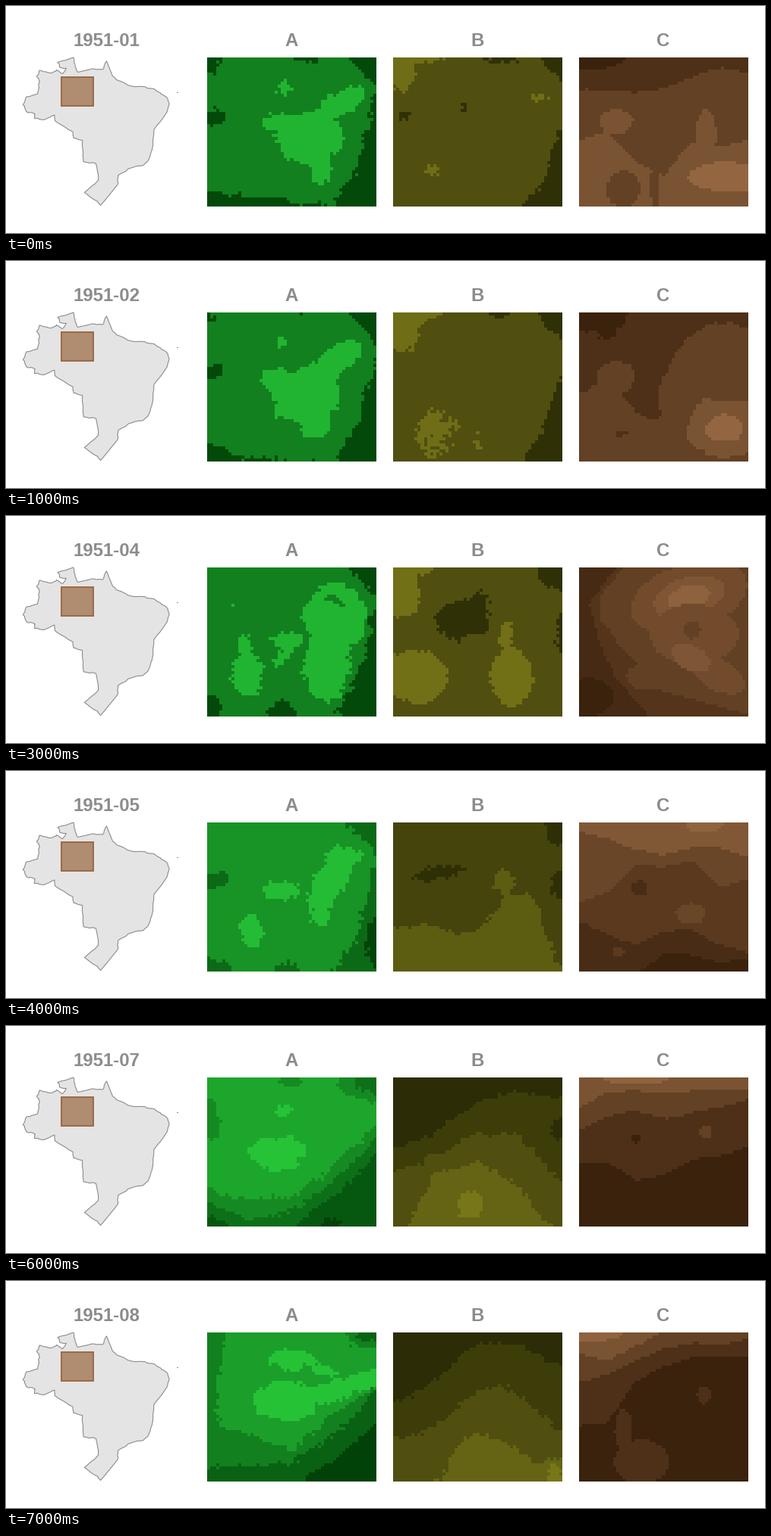
A matplotlib script for the animation above (8000 ms loop, 1000 by 300 pixels).

```python
import numpy as np
import matplotlib.pyplot as plt
from matplotlib.animation import FuncAnimation

COLS, ROWS = 55, 49
LEFT = {"A": 265, "B": 510, "C": 755}
JAG = {"A": 0.9, "B": 0.8, "C": 0.15}
RAMP = {
    "A": ((0, 66, 8), (39, 198, 56)),
    "B": ((44, 44, 6), (123, 122, 26)),
    "C": ((58, 33, 12), (147, 102, 65)),
}
GREY = "#8c8c8c"

rng = np.random.default_rng(7)
fields = {}


def blur(field):
    padded = np.pad(field, 2, mode="edge")
    return sum(padded[r:r + ROWS, c:c + COLS] for r in range(5) for c in range(5)) / 25


def ragged(name):
    """Cell noise plus a smooth drift, which frays the edges of shapes."""
    noise = rng.normal(0, JAG[name], (2, ROWS, COLS))
    return noise[0] + 4 * blur(noise[1])


def panel(name, month, base):
    """Start a field; coordinates run from 0 to 100 both ways."""
    global grid, gx, gy
    grid = fields[name, month] = np.full((ROWS, COLS), float(base))
    gx, gy = np.meshgrid((np.arange(COLS) + 0.5) * 100 / COLS,
                         (np.arange(ROWS) + 0.5) * 100 / ROWS)
    gx, gy = gx + ragged(name), gy + ragged(name)


def blob(levels, x, y, rx, ry, tilt=0):
    """Tilted ellipse; several levels nest inside each other."""
    c, s = np.cos(np.radians(tilt)), np.sin(np.radians(tilt))
    u, v = (gx - x) * c + (gy - y) * s, (gy - y) * c - (gx - x) * s
    radius = np.hypot(u / rx, v / ry)
    for i, level in enumerate(np.atleast_1d(levels)):
        grid[radius < 0.6 ** i] = level


def edge(side, level, *curve):
    """Fill from one side up to a line through evenly spaced key points."""
    along, across = (gx, gy) if side in ("top", "bottom") else (gy, gx)
    line = np.interp(along, np.linspace(0, 100, len(curve)), curve)
    grid[across < line if side in ("top", "left") else across > line] = level


def terraces(side, levels, step, *curve):
    for i, level in enumerate(levels):
        edge(side, level, *(value + i * step for value in curve))


def rim(level, shift=0):
    """Dark right border with a corner on top, common to the early months."""
    edge("right", level, *(x + shift for x in (83, 100, 97, 92, 86, 74)))


def green_fields():
    panel("A", 1, .47)
    rim(.06)
    edge("bottom", .06, 88, 93, 97, 102, 102)
    blob(.06, 0, 3, 6, 10)
    blob(.06, 0, 40, 12, 5)
    blob(.06, 56, 1, 9, 3)
    blob(.87, 61, 54, 20, 17)
    blob(.87, 78, 32, 18, 8, -35)
    blob(.87, 67, 72, 6, 14)
    blob(.87, 44, 44, 11, 6)
    blob(.87, 47, 21, 4, 5)

    panel("A", 3, .47)
    rim(.06)
    blob(.06, 0, 39, 10, 4)
    blob(.06, 0, 97, 12, 11)
    blob(.87, 56, 58, 21, 21)
    blob(.87, 75, 32, 18, 9, -40)
    blob(.87, 38, 45, 10, 7)
    blob(.87, 62, 81, 10, 8)
    blob(.87, 43, 19, 5, 4)

    panel("A", 4, .47)
    rim(.06)
    blob(.06, 45, 99, 9, 9)
    blob(.06, 0, 97, 9, 10)
    blob(.87, 76, 34, 18, 23)
    blob(.87, 71, 67, 14, 23)
    blob(.47, 76, 21, 7, 2, 20)
    blob(.87, 24, 71, 9, 15)
    blob(.87, 22, 53, 4, 8)
    blob(.87, 47, 49, 10, 6)
    blob(.87, 45, 60, 10, 3, -50)
    blob(.87, 14, 24, 4, 2)

    panel("A", 5, .62)
    rim(.31)
    blob(.31, 4, 38, 9, 5)
    blob(.31, 0, 98, 14, 8)
    blob(.31, 48, 99, 7, 5)
    blob(.02, 100, 80, 6, 20)
    blob(.93, 74, 39, 24, 10, -58)
    blob(.93, 81, 24, 11, 8)
    blob(.93, 67, 62, 6, 8)
    blob(.93, 44, 46, 11, 6)
    blob(.93, 26, 73, 7, 12)

    panel("A", 7, .76)
    blob((.55, .35), 99, 2, 22, 14)
    blob(.55, 2, 28, 6, 13)
    blob(.55, 49, 1, 6, 5)
    terraces("bottom", (.55, .35, .17), 10, 74, 84, 80, 58, 32)
    blob(0, 74, 98, 7, 4)
    blob(.98, 42, 49, 17, 9)
    blob(.98, 43, 58, 11, 6)
    blob(.98, 44, 22, 4, 4)

    panel("A", 8, .71)
    edge("left", .47, 11, 7, 7, 10, 10)
    blob((.47, .24), 100, 0, 17, 12)
    edge("bottom", .47, 62, 68, 79, 53, 37)
    edge("bottom", .24, 91, 90, 88, 68, 40)
    edge("bottom", 0, 115, 110, 103, 86, 61)
    blob(.97, 46, 46, 19, 13)
    blob(.97, 80, 37, 30, 6, -22)
    blob(.97, 50, 18, 12, 7)
    blob(.97, 66, 24, 12, 3, 25)


def olive_fields():
    panel("B", 1, .46)
    rim(.06, 3)
    blob(.85, 0, 0, 34, 5)
    blob(.85, 5, 9, 8, 14)
    blob(.85, 87, 27, 6, 2)
    blob(.85, 24, 75, 4, 3)
    blob(.06, 8, 40, 3, 3)
    blob(.06, 42, 34, 1.5, 3)
    blob(.06, 64, 2, 8, 2)

    panel("B", 3, .46)
    rim(.06)
    blob(.88, 0, 0, 34, 7)
    blob(.88, 8, 14, 10, 17)
    blob(.88, 26, 80, 17, 18)
    blob(.88, 50, 84, 4, 13)
    blob(.06, 47, 31, 7, 4, -20)
    blob(.06, 61, 2, 8, 2)

    panel("B", 4, .46)
    blob(.88, 0, 0, 24, 7)
    blob(.88, 6, 18, 10, 16)
    blob(.88, 12, 73, 20, 18)
    blob(.88, 70, 73, 13, 20)
    blob(.88, 67, 45, 4, 10)
    blob(.06, 41, 35, 15, 13)
    blob(.06, 51, 23, 5, 7)
    blob(.06, 98, 3, 13, 12)
    blob(.06, 100, 46, 3, 13)

    panel("B", 5, .31)
    edge("bottom", .63, 71, 68, 73, 73, 50, 49, 103)
    blob(.63, 65, 40, 6, 8)
    blob(.04, 28, 34, 17, 4, -8)
    blob(.04, 99, 3, 9, 13)
    blob(.04, 99, 42, 5, 10)

    panel("B", 7, .22)
    edge("top", 0, 49, 38, 16, 9, 14)
    blob(0, 100, 36, 6, 8)
    edge("bottom", .46, 64, 52, 38, 39, 70)
    edge("bottom", .73, 120, 64, 57, 74, 110)
    blob(.96, 46, 86, 8, 10)

    panel("B", 8, .22)
    edge("top", 0, 48, 32, 8, 9, 23)
    edge("bottom", .46, 70, 68, 54, 39, 36, 50, 71)
    edge("bottom", .73, 150, 140, 82, 67, 74, 87, 84)
    blob(.96, 95, 94, 4, 6)


def brown_fields():
    panel("C", 1, .47)
    edge("top", .23, 21, 22, 24, 21, 13, 7, 10)
    blob(.02, 0, 0, 27, 9)
    edge("bottom", .73, 56, 49, 70, 79, 56, 60, 55)
    blob(.73, 22, 43, 10, 8)
    blob(.73, 75, 52, 6, 17)
    blob(.47, 45, 85, 2.5, 18)
    blob(.47, 26, 88, 10, 12)
    blob(1, 88, 80, 24, 10)

    panel("C", 3, .17)
    edge("right", .36, 74, 60, 49, 51, 53)
    edge("bottom", .36, 84, 86, 70, 80, 80)
    blob(.17, 46, 92, 8, 10)
    blob((.57, .8, 1), 86, 76, 21, 22)
    blob(.57, 79, 28, 3, 5)
    blob(.02, 0, 0, 31, 27)
    blob(.02, 0, 48, 4, 6)

    panel("C", 4, .3)
    edge("left", .14, 22, 6, 12, 22, 42)
    blob(.02, 6, 87, 14, 13)
    edge("right", .45, 26, 14, 12, 22, 36, 50, 105)
    blob(.45, 42, 73, 14, 9)
    blob((.62, .78, .95), 65, 20, 36, 22, -22)
    blob(.62, 68, 45, 26, 20)
    blob(.62, 82, 72, 18, 10, 35)
    blob(.78, 66, 60, 13, 8, 35)
    blob(.45, 67, 42, 5, 6)

    panel("C", 5, .36)
    edge("top", .55, 53, 47, 28, 30, 26, 43, 38)
    edge("top", .8, 6, 11, 18, 22, 17, 17, 23)
    blob(.97, 74, 0, 11, 7)
    blob(.17, 36, 44, 5, 5)
    blob(.55, 66, 61, 9, 7)
    edge("bottom", .17, 66, 75, 82, 73, 72, 82, 87)
    edge("bottom", .02, 130, 115, 103, 88, 89, 94, 91)
    blob(.36, 23, 87, 4, 3)

    panel("C", 7, .02)
    edge("top", .23, 57, 56, 69, 65, 55, 52, 47)
    edge("top", .47, 36, 26, 22, 28, 24, 20, 15)
    edge("top", .73, 20, 10, 9, 11, 9, 8, 8)
    blob(.97, 34, 0, 20, 5)
    blob(.47, 75, 37, 4, 4)
    blob(.02, 34, 41, 3, 3)

    panel("C", 8, .02)
    edge("top", .23, 62, 60, 33, 23, 17, 16, 16)
    edge("top", .47, 34, 28, 19, 11, 7, 8, 5)
    edge("top", .73, 14, 19, 9, 0, -5, -5, -5)
    blob(.97, 3, 0, 22, 7)
    blob(.23, 37, 87, 16, 15)
    blob(.23, 26, 65, 5, 14)
    blob(.23, 74, 42, 4, 6)


def between(name, month):
    """Month halfway between its neighbours, cut into the same levels."""
    before, after = fields[name, month - 1], fields[name, month + 1]
    mean = (blur(before) + blur(after)) / 2 + ragged(name) * 0.03
    levels = np.unique(before)
    nearest = np.abs(mean[..., None] - levels).argmin(axis=2)
    fields[name, month] = levels[nearest]


green_fields()
olive_fields()
brown_fields()
for name in LEFT:
    between(name, 2)
    between(name, 6)


def colours(name, month):
    low, high = np.array(RAMP[name]) / 255
    return low + fields[name, month][..., None] * (high - low)


def coastline(points, splits=4):
    """Roughen a polygon by adding jittered points along each side."""
    pts = np.array(points, float)
    steps = np.arange(splits)[:, None] / splits
    sides = [a + (b - a) * steps for a, b in zip(pts, np.roll(pts, -1, axis=0))]
    return np.concatenate(sides) + rng.uniform(-0.7, 0.7, (splits * len(pts), 2))


OUTLINE = [
    (89, 68), (91, 80), (95, 88), (112, 83), (127, 84), (132, 73), (141, 92),
    (146, 98), (166, 106), (183, 107), (195, 110), (205, 117), (213, 122),
    (215, 131), (211, 143), (195, 163), (193, 190), (187, 205), (181, 211),
    (166, 213), (148, 224), (147, 236), (124, 264), (121, 258), (103, 247),
    (122, 230), (118, 208), (102, 206), (100, 178), (89, 174), (88, 166),
    (65, 153), (64, 144), (50, 150), (38, 148), (38, 142), (27, 140), (23, 130),
    (27, 120), (42, 116), (44, 100), (41, 92), (45, 85), (60, 89), (67, 85),
    (75, 90), (79, 82), (72, 82), (68, 74),
]

fig = plt.figure(figsize=(10, 3), dpi=100, facecolor="white")
ax = fig.add_axes([0, 0, 1, 1])
ax.axis("off")


def label(x, text):
    return ax.text(x, 53, text, ha="center", va="baseline", color=GREY,
                   family="Liberation Sans", weight="bold", size=24 * 0.72)


ax.add_patch(plt.Polygon(coastline(OUTLINE), fc="#e4e4e4", ec=GREY, lw=0.8))
ax.add_patch(plt.Rectangle((73, 94), 42, 38, fc="#b08c70", ec="#9c6a44", lw=1.4))
ax.add_patch(plt.Rectangle((225, 113.5), 1.5, 1.2, fc=GREY, lw=0))

date = label(132.5, "")
images = {}
for name, x in LEFT.items():
    label(x + 111, name)
    images[name] = ax.imshow(colours(name, 1), extent=(x, x + 222.6, 265, 68),
                             interpolation="nearest")
ax.set(xlim=(0, 1000), ylim=(300, 0), aspect="auto")


def draw(frame):
    month = frame + 1
    date.set_text(f"1951-{month:02d}")
    for name, image in images.items():
        image.set_data(colours(name, month))
    return [date, *images.values()]


animation = FuncAnimation(fig, draw, frames=8, interval=1000, repeat=True)
plt.show()
```
